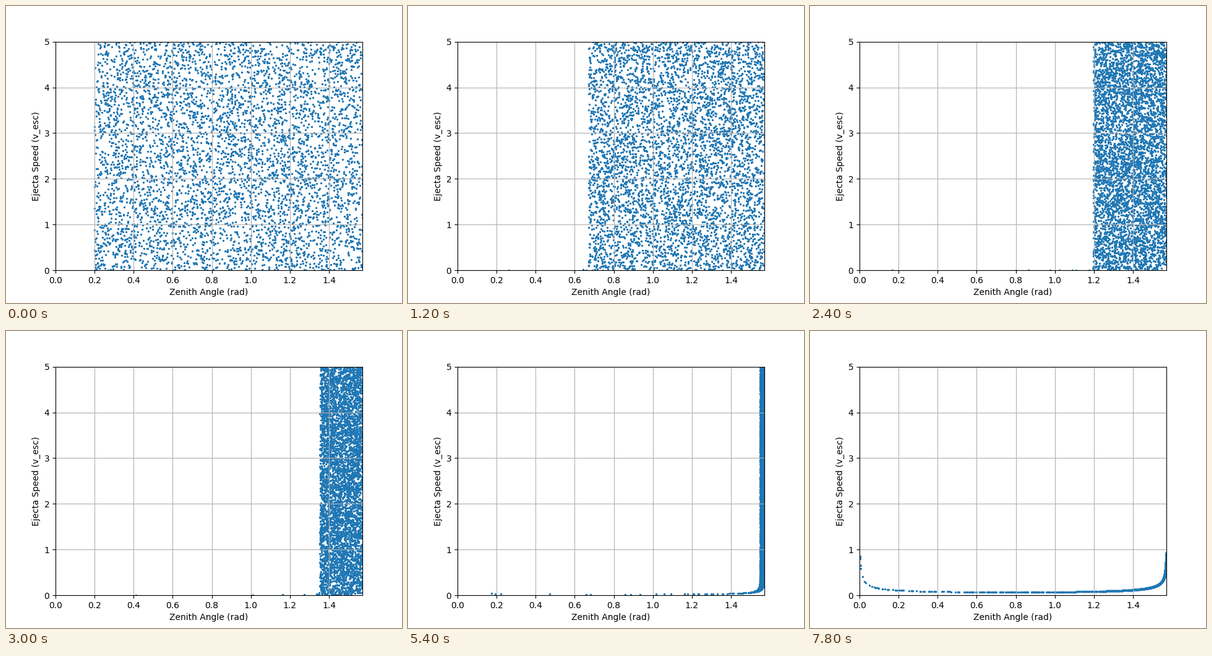
Write a matplotlib script that moves like this. It is 640x480 px and loops after 8 s.

```python
import numpy as np
import matplotlib.pyplot as plt
from matplotlib.animation import FuncAnimation

STEP_MS, TICK_MS, LOOP_MS = 300, 100, 8000
POINTS = 5000
V_MAX = 5
HEIGHT = 2.12e-5  # target size in body radii
WIDTH = 0.1 * HEIGHT

# Zenith angles packed closely towards the horizon
ZENITH = np.pi / 2 - np.geomspace(np.pi / 2 - 1e-6, 1e-7, 40000)


def distance(step):
    """Distance to the target in body radii, log-spaced by step."""
    near = 0.0524 * HEIGHT * np.exp(-(step / 3.4) ** 2)
    return 9.6e-3 * 10 ** ((step - 26) / 8) - near


def speed(zenith, dist, height):
    """Launch speed that passes the given height at the given distance."""
    q = 1 / np.tan(zenith) / dist + 0.5 - height / dist ** 2
    v = 0.5 / (np.sin(zenith) * np.sqrt(np.maximum(q, 1e-9)))
    return np.minimum(v, V_MAX)


def speed_range(zenith, dist):
    """Slowest and fastest launch that meets the front or the roof."""
    front = speed(zenith, dist, HEIGHT)
    roof = speed(zenith, dist + WIDTH, HEIGHT)
    return speed(zenith, dist, 0), np.maximum(front, roof)


def hits(step):
    """Random launches, uniform over the region that meets the target."""
    rng = np.random.default_rng(100 + step)
    dist = distance(step)
    low, high = speed_range(ZENITH, dist)
    band = high - low
    area = np.cumsum((band[1:] + band[:-1]) / 2 * np.diff(ZENITH))
    area = np.concatenate([[0], area])
    zenith = np.interp(rng.uniform(0, area[-1], POINTS), area, ZENITH)
    return np.column_stack([zenith, rng.uniform(*speed_range(zenith, dist))])


fig, ax = plt.subplots(figsize=(6.4, 4.8), dpi=100)
ax.set_xlim(0, np.pi / 2)
ax.set_ylim(0, V_MAX)
ax.set_xlabel("Zenith Angle (rad)")
ax.set_ylabel("Ejecta Speed (v_esc)")
ax.grid(True)
dots = ax.scatter([], [], s=2, color="C0")


def update(frame):
    dots.set_offsets(hits(frame * TICK_MS // STEP_MS))
    return (dots,)


anim = FuncAnimation(fig, update, frames=LOOP_MS // TICK_MS, interval=TICK_MS,
                     repeat=True, repeat_delay=0)
plt.show()
```
